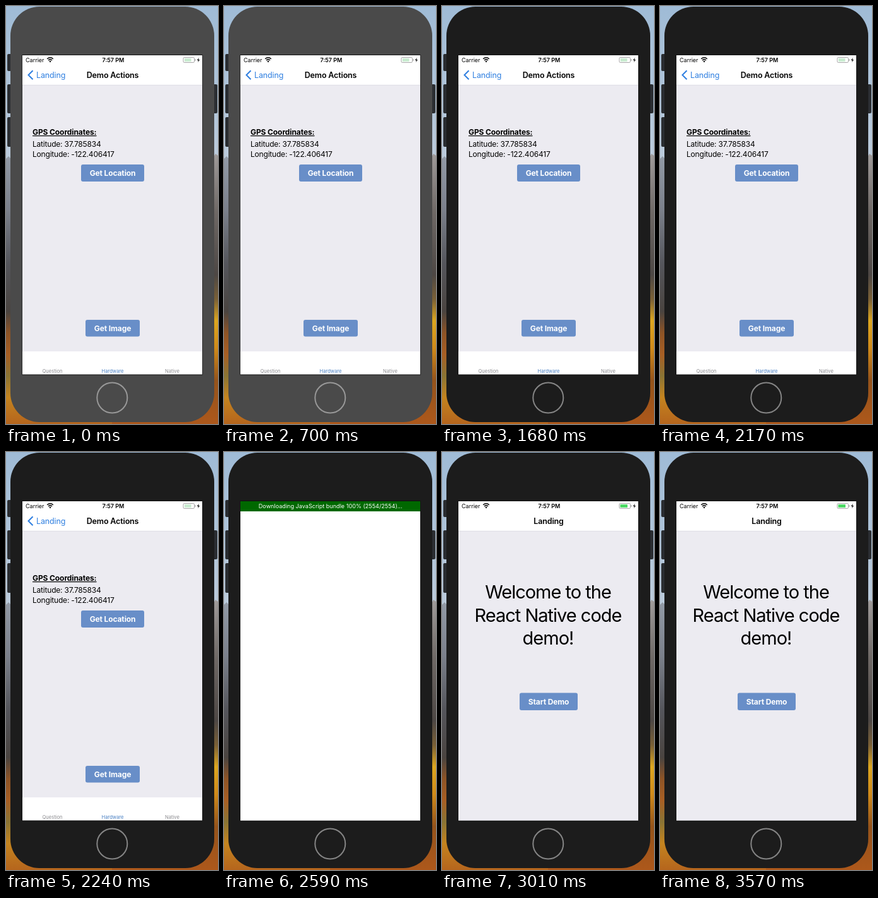
These frames come from a looping animation (336x662 px, 3640 ms). An HTML page:

```html
<!DOCTYPE html>
<html lang="en">
<head>
<meta charset="utf-8">
<title>App demo</title>
<style>
  html, body { margin: 0; width: 100%; height: 100%; overflow: hidden; background: #a3bdd6; }
  svg { display: block; width: 336px; height: 662px; font-family: Inter, Roboto, sans-serif; }

  .case, .ring, .actions, .loading, .landing { animation: 3640ms step-end infinite; }
  .case { animation-name: focus-case; }
  .ring { animation-name: focus-ring; fill: none; stroke-width: 2; }
  .actions { animation-name: actions; }
  .loading { animation-name: loading; }
  .landing { animation-name: landing; }
  .progress { animation: progress 3640ms linear infinite; }

  @keyframes focus-case { 0% { fill: #4a4a4a; } 26.9%, 100% { fill: #1c1c1c; } }
  @keyframes focus-ring { 0% { stroke: #989898; } 26.9%, 100% { stroke: #858585; } }
  @keyframes actions { 0% { visibility: visible; } 65.3%, 100% { visibility: hidden; } }
  @keyframes loading { 0% { visibility: hidden; } 65.3% { visibility: visible; } 72.9%, 100% { visibility: hidden; } }
  @keyframes landing { 0% { visibility: hidden; } 72.9%, 100% { visibility: visible; } }
  @keyframes progress {
    0%, 65.29% { opacity: 0; }
    65.3%, 72.2% { opacity: 1; }
    73.1% { opacity: .92; }
    80%, 100% { opacity: 0; }
  }

  .mid { text-anchor: middle; }
  .status { font-size: 9px; }
  .title { font-size: 12.5px; font-weight: 600; letter-spacing: -.15px; }
  .back { font-size: 12.5px; letter-spacing: -.15px; fill: #2f7fe0; }
  .info { font-size: 12px; letter-spacing: -.2px; }
  .head { font-size: 12px; font-weight: 700; letter-spacing: -.1px; text-decoration: underline; }
  .btn { fill: #688ec8; }
  .label { font-size: 12px; font-weight: 700; letter-spacing: -.12px; fill: #fff; }
  .hero { font-size: 29px; letter-spacing: -1px; }
  .tab { font-size: 7.6px; fill: #8c8c90; }
  .bundle { font-size: 9.1px; fill: #fff; }
</style>
</head>
<body>
<svg viewBox="0 0 336 662">
  <defs>
    <linearGradient id="sky" x2="0" y2="1">
      <stop stop-color="#9fbbd6"/><stop offset="1" stop-color="#bccbdb"/>
    </linearGradient>
    <linearGradient id="west" gradientUnits="userSpaceOnUse" x1="0" x2="0" y1="238" y2="662">
      <stop stop-color="#929aa6"/><stop offset=".2" stop-color="#7b808b"/>
      <stop offset=".4" stop-color="#55565c"/><stop offset=".58" stop-color="#4a4440"/>
      <stop offset=".66" stop-color="#8e5426"/><stop offset=".74" stop-color="#a85f24"/>
      <stop offset=".82" stop-color="#8a7434"/><stop offset=".9" stop-color="#c4841f"/>
      <stop offset="1" stop-color="#b5651d"/>
    </linearGradient>
    <linearGradient id="east" gradientUnits="userSpaceOnUse" x1="0" x2="0" y1="232" y2="662">
      <stop stop-color="#a09c9b"/><stop offset=".22" stop-color="#6e6865"/>
      <stop offset=".45" stop-color="#4d4744"/><stop offset=".54" stop-color="#7a6036"/>
      <stop offset=".62" stop-color="#dca61f"/><stop offset=".72" stop-color="#cf8a1a"/>
      <stop offset=".84" stop-color="#94531b"/><stop offset="1" stop-color="#ad581b"/>
    </linearGradient>
    <g id="bar">
      <rect x="26" y="78" width="285" height="47" fill="#fff"/>
      <path d="M26 125.3H311" stroke="#d9d8de" stroke-width=".7"/>
      <text class="status" x="31" y="88.5">Carrier</text>
      <g fill="none" stroke="#000" stroke-width="1.5">
        <path d="M65.2 83.7a7 7 0 0 1 9.6 0M67 86a4.4 4.4 0 0 1 6 0"/>
      </g>
      <path d="M70 89.4l-1.6-1.9a2.4 2.4 0 0 1 3.2 0z"/>
      <text class="status mid" x="170" y="88.5" font-weight="600">7:57 PM</text>
      <path d="M305.8 81.8l-3 4.2h2l-.8 3.2 3-4.3h-2z"/>
    </g>
    <g id="cell">
      <rect x="281" y="81.5" width="17.5" height="8" rx="1.8" fill="none" stroke="#909090" stroke-width=".8"/>
      <path d="M299.5 84v3q1.2-.3 1.2-1.5t-1.2-1.5" fill="#909090"/>
    </g>
  </defs>

  <rect width="336" height="245" fill="url(#sky)"/>
  <path d="M0 242l4-4 8 8V662H0z" fill="url(#west)"/>
  <path d="M326 244l6-10 4 3V662H326z" fill="url(#east)"/>
  <path d="M0 608h168v54H0z" fill="url(#west)"/>
  <path d="M168 608h168v54H168z" fill="url(#east)"/>

  <g fill="#2a2d31">
    <rect x="2" y="76" width="8" height="27" rx="2"/>
    <rect x="2" y="124" width="8" height="46" rx="2"/>
    <rect x="2" y="176" width="8" height="47" rx="2"/>
    <rect x="328" y="124" width="7" height="46" rx="2"/>
  </g>
  <rect class="case" x="7" y="1" width="323" height="658" rx="46"/>
  <circle class="ring" cx="168.3" cy="620.5" r="24"/>
  <rect x="25.5" y="77" width="286" height="507.5" fill="#111"/>
  <rect x="26" y="78" width="285" height="505.5" fill="#fff"/>

  <g class="actions">
    <rect x="26" y="125" width="285" height="422" fill="#ecebf1"/>
    <use href="#bar"/>
    <use href="#cell"/>
    <rect x="283" y="83" width="10.5" height="5" fill="#c9ecd0"/>
    <path d="M42.5 102.2l-7 7 7 7" fill="none" stroke="#2f7fe0" stroke-width="2"/>
    <text class="back" x="48" y="114">Landing</text>
    <text class="title mid" x="169" y="114">Demo Actions</text>
    <text class="head" x="42" y="204">GPS Coordinates:</text>
    <text class="info" x="42" y="222.5">Latitude: 37.785834</text>
    <text class="info" x="42" y="239">Longitude: -122.406417</text>
    <rect class="btn" x="119" y="251" width="100" height="27" rx="3"/>
    <text class="label mid" x="169" y="269">Get Location</text>
    <rect class="btn" x="126" y="497" width="86" height="26.5" rx="3"/>
    <text class="label mid" x="169" y="514.5">Get Image</text>
    <text class="tab mid" x="73.5" y="581">Question</text>
    <text class="tab mid" x="169" y="581" style="fill:#4a80c4">Hardware</text>
    <text class="tab mid" x="263.5" y="581">Native</text>
  </g>

  <rect class="loading" x="26" y="78" width="285" height="505.5" fill="#fff"/>

  <g class="landing">
    <rect x="26" y="125" width="285" height="458.5" fill="#ecebf1"/>
    <use href="#bar"/>
    <use href="#cell"/>
    <rect x="282.5" y="83" width="11.5" height="5" rx=".6" fill="#4cd964"/>
    <text class="title mid" x="169" y="114">Landing</text>
    <g class="hero mid">
      <text x="168" y="232">Welcome to the</text>
      <text x="168" y="268.5">React Native code</text>
      <text x="168" y="305">demo!</text>
    </g>
    <rect class="btn" x="123" y="381.5" width="92" height="27.5" rx="3"/>
    <text class="label mid" x="169" y="399.7">Start Demo</text>
  </g>

  <g class="progress">
    <rect x="26" y="78" width="285" height="16" fill="#006800"/>
    <text class="bundle mid" x="168.7" y="89.3">Downloading JavaScript bundle 100% (2554/2554)...</text>
  </g>
</svg>
</body>
</html>
```
